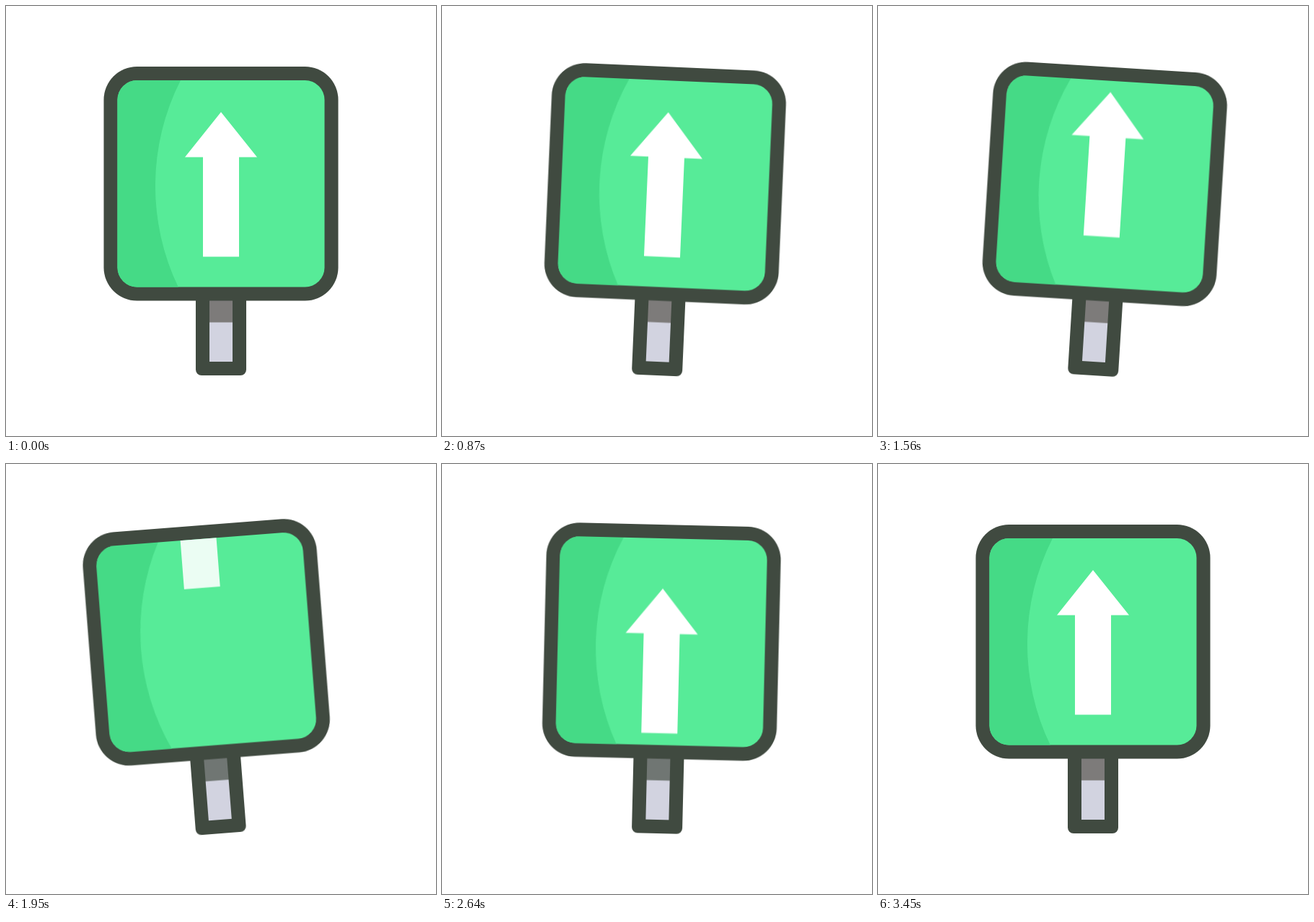
These frames come from a looping animation (596 by 596 pixels, 4.53 s). An HTML page:

```html
<!DOCTYPE html>
<html lang="en">
<head>
<meta charset="utf-8">
<title>Swinging road sign</title>
<style>
  html, body { margin: 0; width: 100%; height: 100%; overflow: hidden; background: #fff; }
  svg { display: block; width: 100%; height: 100%; }

  .sign, .arrow, .shade { animation: 4530ms infinite; }
  .sign {
    transform-origin: 298px 508px;
    animation-name: swing;
    animation-timing-function: cubic-bezier(.333, 0, .667, 1);
  }
  .arrow { fill: #fff; animation-name: travel, tint; animation-timing-function: linear; }
  .shade { fill: #7d7b7a; animation-name: dim; animation-timing-function: linear; }

  /* damped swing around the foot of the pole */
  @keyframes swing {
    0%, 10.817% { transform: rotate(0deg); }
    29.801% { transform: rotate(6deg); }
    45.143% { transform: rotate(-5deg); }
    55.188% { transform: rotate(2.15deg); }
    65.563% { transform: rotate(-1.42deg); }
    70.64%, 100% { transform: rotate(0deg); }
  }

  /* speeds out through the top, returns from below, overshoots, settles */
  @keyframes travel {
    0% { transform: translateY(0); }
    28.698% { transform: translateY(0); animation-timing-function: cubic-bezier(.333, 0, .667, .333); }
    46.026% { transform: translateY(-257px); animation-timing-function: step-end; }
    48.344% { transform: translateY(255px); animation-timing-function: cubic-bezier(.333, .667, .667, 1); }
    65.563% { transform: translateY(-24px); animation-timing-function: cubic-bezier(.333, 0, .667, 1); }
    76.159%, 100% { transform: translateY(0); }
  }

  @keyframes tint {
    0%, 39% { fill: #fff; }
    43%, 46% { fill: #ebfdf3; }
    48.344%, 65.563% { fill: #fff; }
    70.5%, 71.2% { fill: #ebfdf3; }
    76.159%, 100% { fill: #fff; }
  }

  @keyframes dim {
    0%, 39% { fill: #7d7b7a; }
    43%, 59% { fill: #707673; }
    70.64%, 100% { fill: #7d7b7a; }
  }
</style>
</head>
<body>
<svg viewBox="0 0 596 596">
  <defs>
    <clipPath id="face"><rect x="154.5" y="103" width="287" height="286.5" rx="27"/></clipPath>
  </defs>
  <g class="sign">
    <rect x="263" y="380" width="70" height="132" rx="8" fill="#404a40"/>
    <rect x="282" y="438" width="32" height="55" fill="#d2d3e0"/>
    <rect class="shade" x="282" y="400" width="32" height="38.5"/>
    <rect x="135.5" y="84" width="325" height="324.5" rx="46" fill="#404a40"/>
    <g clip-path="url(#face)">
      <rect x="154" y="102" width="288" height="288" fill="#57eb98"/>
      <path d="M150 100H243.2L242 103A324 324 0 0 0 239 390H150Z" fill="#45da86"/>
      <path class="arrow" d="M298 147L348 209.5H323V347.5H273V209.5H248Z"/>
    </g>
  </g>
</svg>
</body>
</html>
```
